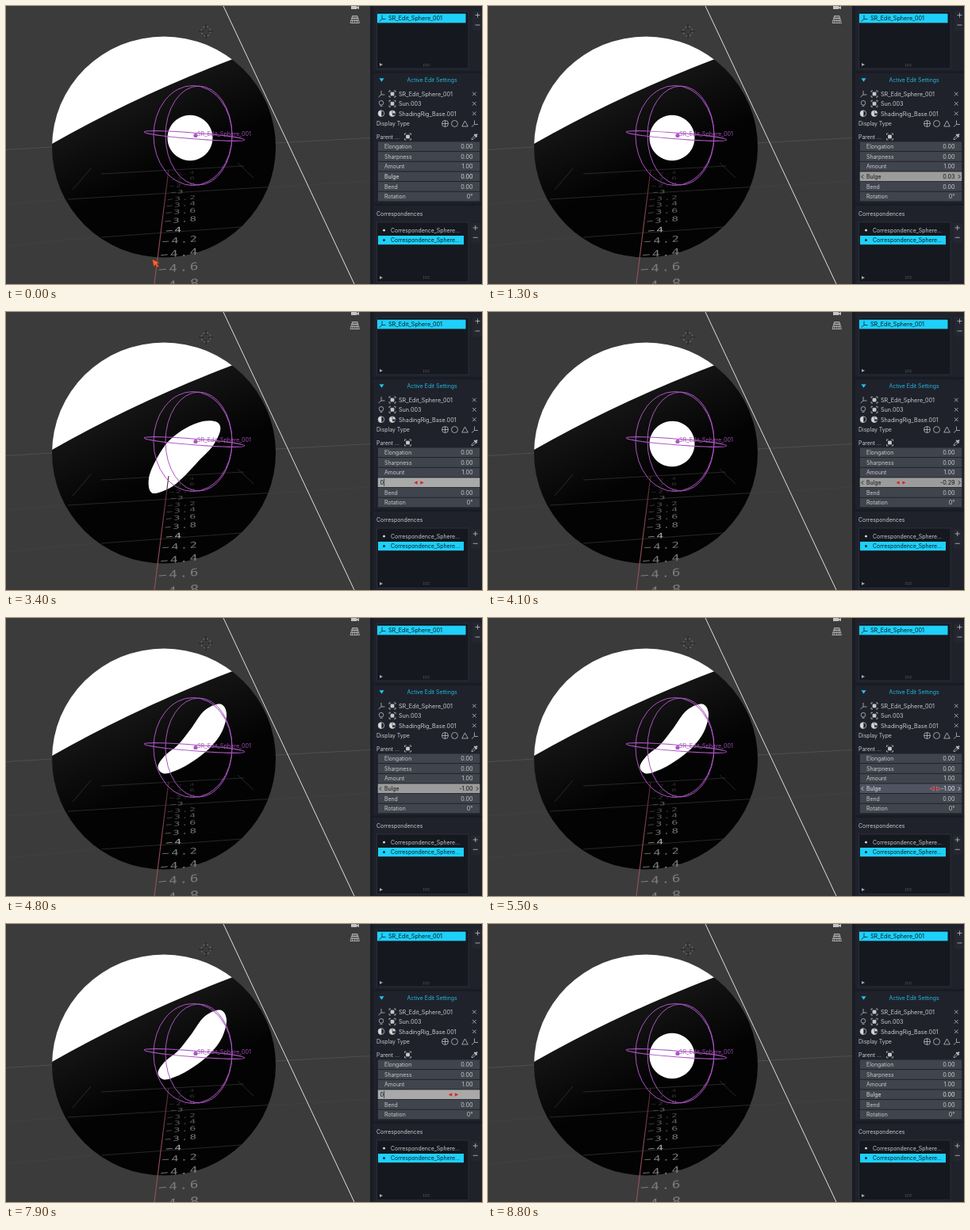
Write an HTML page that moves like this. It is 600 px wide and 351 px high and loops after 8900 ms.

```html
<!DOCTYPE html>
<html lang="en">
<head>
<meta charset="utf-8">
<title>Bulge control</title>
<style>
  html, body { margin: 0; width: 100%; height: 100%; overflow: hidden; background: #3b3b3b; }
  svg { display: block; width: 100vw; height: 100vh; }
  text { font-family: Inter, sans-serif; font-size: 6.9px; fill: #c9cacd; white-space: pre; }
  .name { font-size: 7.2px; }
  .mono { font-family: "DejaVu Sans Mono", monospace; font-size: 11px; }
  .ink { fill: #0b1820; }
  .icon { fill: none; stroke: #bdbec2; stroke-width: .8; }
  .ring { fill: none; stroke: #ac54c2; stroke-width: 1; }
  .grid { fill: none; stroke: #555; stroke-width: .8; }
  .box { fill: #15181f; stroke: #2f333d; stroke-width: .8; }
  .button { fill: #242730; }
  .pick { fill: #1ed0fa; }
</style>
</head>
<body>
<svg id="stage" viewBox="0 0 600 351" preserveAspectRatio="none">
  <defs>
    <clipPath id="ball"><ellipse cx="199" cy="178" rx="141" ry="139.5"/></clipPath>
    <linearGradient id="axis" x1="0" y1="207" x2="0" y2="351" gradientUnits="userSpaceOnUse">
      <stop offset="0" stop-color="#4e262c"/>
      <stop offset=".5" stop-color="#8d4a52"/>
      <stop offset="1" stop-color="#96525a"/>
    </linearGradient>
    <linearGradient id="shade" x1="172" y1="118" x2="210" y2="200" gradientUnits="userSpaceOnUse">
      <stop offset="0" stop-color="#141414"/>
      <stop offset="1" stop-color="#030303"/>
    </linearGradient>
  </defs>

  <rect width="460" height="351" fill="#3b3b3b"/>
  <path class="grid" d="M0 181.5L58 178M340 173L459 166.5"/>
  <path class="grid" stroke-opacity=".25" d="M0 250L85 243M332 229L459 221M0 303L110 292"/>

  <g clip-path="url(#ball)">
    <rect x="50" y="30" width="300" height="300" fill="url(#shade)"/>
    <path d="M50 178L58 174Q165 113 286 67L340 20H50Z" fill="#fff"/>
    <path class="grid" stroke-opacity=".55" d="M78 244L340 228M120 292L325 277M107 205L84 232M292 198L312 217M120 212L300 202"/>
  </g>
  <path d="M274 0L439 351" stroke="#dedede" fill="none"/>
  <path id="spot" fill="#fff"/>
  <path d="M205 207L187 351" stroke="url(#axis)" stroke-width="1.1"/>
  <g id="ruler"></g>

  <ellipse class="ring" cx="235.5" cy="163.5" rx="49.5" ry="63"/>
  <ellipse class="ring" cx="243" cy="163.5" rx="42" ry="62.5"/>
  <ellipse class="ring" cx="237.5" cy="164" rx="63.5" ry="3.8" transform="rotate(4.5 237.5 164)"/>
  <circle cx="239" cy="163.5" r="2.6" fill="#ac54c2"/>
  <text class="name" x="241" y="164" style="fill:#9f4fb4">SR_Edit_Sphere_001</text>

  <g fill="none">
    <circle cx="252" cy="32" r="6" stroke="#8a7676" stroke-dasharray="2.4 2.3"/>
    <path d="M252 23v6M252 35v6M243 32h6M255 32h6" stroke="#1e1e1e" stroke-width=".9"/>
  </g>
  <path d="M435 0h7v1.2l3-1.2v4l-3-1v1h-7z" fill="#c4c4c4"/>
  <path class="icon" d="M436.5 12.5h6.5l2.4 9h-11.4zM435.5 15.5h8.6M434.7 18.5h10M439.8 12.5v9M437.7 12.5l-1 9M441.8 12.5l1 9"/>

  <rect x="459" width="141" height="351" fill="#191c24"/>
  <rect x="463" y="0" width="137" height="82" fill="#1f222b"/>
  <rect x="463" y="85" width="137" height="164" fill="#1f222b"/>
  <rect x="463" y="252" width="137" height="99" fill="#1f222b"/>

  <rect class="box" x="467.5" y="7" width="115.5" height="72"/>
  <rect class="pick" x="468" y="9.7" width="111.5" height="11.6"/>
  <text class="name ink" x="482" y="18.1">SR_Edit_Sphere_001</text>
  <rect class="box" x="467.5" y="273" width="115.5" height="75.5"/>
  <rect class="pick" x="469" y="290" width="108" height="11.2"/>
  <text x="485" y="285.8">Correspondence_Sphere...</text>
  <text class="ink" x="485" y="298.3">Correspondence_Sphere...</text>
  <circle cx="476.5" cy="283.2" r="1.4" fill="#ddd"/>
  <circle cx="476.5" cy="295.7" r="1.4" fill="#0b1820"/>
  <path d="M471 72l4 2-4 2zM471 341l4 2-4 2z" fill="#a5a7ab"/>
  <path d="M526 73.7h8M526 75.7h8M526 341.7h8M526 343.7h8" stroke="#686b73" stroke-width=".9" stroke-dasharray="1 1.2"/>

  <rect class="button" x="588" y="6" width="12" height="25" rx="2"/>
  <rect class="button" x="586" y="274" width="12" height="25" rx="2"/>
  <path class="icon" d="M591.5 11.5h6M594.5 8.5v6M591.5 24h6M588.7 280h6M591.7 277v6M588.7 292.3h6"/>

  <path d="M470.5 91.3h6l-3 4.4z" fill="#22c3ea"/>
  <text x="505.5" y="96" style="fill:#22b9df">Active Edit Settings</text>
  <text class="name" x="495" y="113.7">SR_Edit_Sphere_001</text>
  <text class="name" x="495" y="126">Sun.003</text>
  <text class="name" x="495" y="138.5">ShadingRig_Base.001</text>
  <text x="467" y="151.4">Display Type</text>
  <text x="467" y="167.6">Parent ...</text>
  <text x="467" y="265.3">Correspondences</text>

  <g class="icon">
    <circle cx="473" cy="122.3" r="2.8"/><path d="M471.5 126.3h3"/>
    <circle cx="473" cy="135.7" r="3.8"/><path d="M473 131.9a3.8 3.8 0 0 0 0 7.6z" fill="#ddd"/>
    <circle cx="487" cy="135.7" r="3.8" fill="#d6d6d6"/><path d="M487 132v3.7h3.7v2h-3.7" fill="#22252f" stroke="#555"/>
    <circle cx="553.5" cy="148.5" r="4"/><path d="M549.5 148.5h8M553.5 144.5v8"/>
    <circle cx="565.5" cy="148.5" r="4"/>
    <path d="M578.5 145l3.8 7h-7.6z"/>
    <path d="M587 168.7l.4-1.8 3.5-3.5 1.5 1.5-3.5 3.5z"/><path d="M590.3 162l3.3 3.3M592 163.6l2-2" stroke-width="1.8"/>
  </g>
  <g id="icons" class="icon"></g>

  <rect x="467.7" y="171" width="130.3" height="76.3" rx="2" fill="#191b22"/>
  <g id="fields"></g>
  <g id="entry">
    <text class="name ink" x="471.5" y="218">0</text>
    <path d="M476.6 210.5v9.5" stroke="#24506e"/>
  </g>

  <path id="arrow" d="M0 0l9 4.2-3.4 1 2.5 3.6-1.8 1.3-2.5-3.7-2 2.8z" fill="#ff622b" stroke="#8a2f18" stroke-width=".5"/>
  <path id="slide" d="M-1.6 -2.6v5.2l-5-2.6zM1.6 -2.6v5.2l5-2.6z" fill="#b92a2a" stroke="#d79a94" stroke-width=".5"/>
</svg>
<script>
const LOOP = 8900, TAU = Math.PI * 2;
const $ = id => document.getElementById(id);

function add(parent, tag, attrs, label) {
  const el = document.createElementNS("http://www.w3.org/2000/svg", tag);
  for (const key in attrs) el.setAttribute(key, attrs[key]);
  if (label !== undefined) el.textContent = label;
  parent.appendChild(el);
  return el;
}

// Floor ruler, shrinking with distance
[213, 220, 228, 236, 245, 253, 262, 273, 285, 299, 316, 335, 357].forEach((y, i) => {
  const value = 2.4 + i * 0.2, whole = i === 3 || i === 8;
  const k = 1 + (y - 299) * 0.0037;
  const x = 208 - (y - 207) * 0.125 + (whole ? 3 : 0);
  add($("ruler"), "text", {
    class: "mono", "letter-spacing": 1.6,
    transform: `translate(${x} ${y + 2 * k}) skewY(-5) scale(${1.42 * k} ${0.92 * k * k})`,
    style: `fill:${whole ? "#a8a8a8" : "#7c7c7c"};opacity:${Math.min(1, 0.25 + (y - 205) / 90)}`
  }, "−" + (whole ? value.toFixed(0) : value.toFixed(1)));
});

const icon = d => add($("icons"), "path", { d });
const axes = (x, y) => icon(`M${x} ${y - 4}v5h4.5M${x} ${y + 1}l-3.5 3`);
function frame(x, y) {
  icon(`M${x - 4} ${y - 2}v-2h2m4 0h2v2m0 4v2h-2m-4 0h-2v-2`);
  icon(`M${x - 2} ${y - 2}h4v4h-4z`).setAttribute("fill", "#c9cacd");
}
axes(473, 111); axes(590.5, 148.5);
axes(474, 15.5).setAttribute("stroke", "#123");
frame(487, 111); frame(487, 123.3); frame(506.5, 165);
[111, 123.3, 135.8].forEach(y => icon(`M588 ${y - 2.3}l4.6 4.6m0 -4.6l-4.6 4.6`));

const rows = [["Elongation", "0.00"], ["Sharpness", "0.00"], ["Amount", "1.00"],
              ["Bulge", "0.00"], ["Bend", "0.00"], ["Rotation", "0°"]].map(([label, value], i) => {
  const y = 171.4 + i * 12.65;
  return {
    bar: add($("fields"), "rect", { x: 468.7, y, width: 128.6, height: 11.8, fill: "#40444d" }),
    label: add($("fields"), "text", { x: 477, y: y + 8.5 }, label),
    value: add($("fields"), "text", { class: "name", x: 588.5, y: y + 8.5, "text-anchor": "end" }, value)
  };
});
const bulge = rows[3];
const tips = add($("fields"), "path", { d: "M473 213.3l-2 2.2 2 2.2M593 213.3l2 2.2-2 2.2", fill: "none", "stroke-width": 0.9 });

// Spot outlines, clockwise from the upper right tip
const plus = [[266,139],[270,150],[260,170],[241,190],[222,210],[205,223],
              [184,228.5],[180,210],[190,185],[205,163],[226,147],[248,138]];
const minus = [[270,108.5],[278,121],[272,144],[258,163],[240,178],[220,190],
               [200,196.5],[191.5,188],[200,174],[217,160],[233,140],[250,117]];
const round = plus.map((_, i) => {
  const a = (i / 12 - 0.125) * TAU;
  return [232 + 28.5 * Math.cos(a), 166.5 + 28.8 * Math.sin(a)];
});

function smooth(pts) {
  const n = pts.length, at = i => pts[(i + n) % n];
  let d = "M" + pts[0];
  for (let i = 0; i < n; i++) {
    const [a, b, c, e] = [at(i - 1), at(i), at(i + 1), at(i + 2)];
    const p = b.map((v, j) => v + (c[j] - a[j]) / 6);
    const q = c.map((v, j) => v - (e[j] - b[j]) / 6);
    d += `C${p} ${q} ${c}`;
  }
  return d + "Z";
}

function spot(b) {
  const goal = b > 0 ? plus : minus, k = Math.abs(b);
  return smooth(round.map((p, i) => p.map((v, j) => v + (goal[i][j] - v) * k)));
}

// Piecewise linear track of [time, value] keys
function track(keys, t) {
  const i = keys.findIndex(k => k[0] > t);
  if (i < 0) return keys[keys.length - 1][1];
  if (!i) return keys[0][1];
  const [t0, a] = keys[i - 1], [t1, b] = keys[i];
  return a + (b - a) * (t - t0) / (t1 - t0);
}
// Drag up, reset by typing, drag down, reset by typing
const amount = [[1250, 0], [1350, 0.06], [2200, 1], [3500, 1], [3501, 0],
                [4000, 0], [4100, -0.29], [4700, -1], [8250, -1], [8251, 0]];
const slideX = [[4200, 520.5], [5000, 520.5], [5450, 564]];
const LAG = 100;

const within = (t, a, b) => t >= a && t < b;
const show = (el, on) => el.setAttribute("visibility", on ? "visible" : "hidden");

function draw(t) {
  const b = track(amount, t);
  const drag = within(t, 1200, 2800) || within(t, 3950, 5000);
  const typing = within(t, 3100, 3500) || within(t, 7400, 8250);
  const hover = within(t, 900, 8250) && !drag && !typing;
  $("spot").setAttribute("d", spot(b && track(amount, t - LAG)));

  bulge.bar.setAttribute("fill", typing ? "#a9a9a9" : drag ? "#9c9c9c" : hover ? "#4f5462" : "#40444d");
  const ink = drag ? "#151515" : "#e2e2e4";
  for (const el of [bulge.label, bulge.value]) {
    el.style.fill = ink;
    show(el, !typing);
  }
  bulge.value.textContent = (Math.abs(b) < 0.005 ? 0 : b).toFixed(2);
  tips.setAttribute("stroke", ink);
  show(tips, drag || hover);
  show($("entry"), typing);

  const m = Math.min(1, t / 900), e = m * m * (3 - 2 * m);
  $("arrow").setAttribute("transform", `translate(${184.5 + 331 * e} ${320 - 105 * e})`);
  show($("arrow"), t < 900);
  // The pointer hides while a drag is under way
  $("slide").setAttribute("transform", `translate(${track(slideX, t)} 215.5)`);
  show($("slide"), within(t, 900, 1250) || within(t, 2800, 4200) || within(t, 5000, 8250));
}

const start = performance.now();
function tick() {
  draw((performance.now() - start) % LOOP);
  requestAnimationFrame(tick);
}
tick();
</script>
</body>
</html>
```
